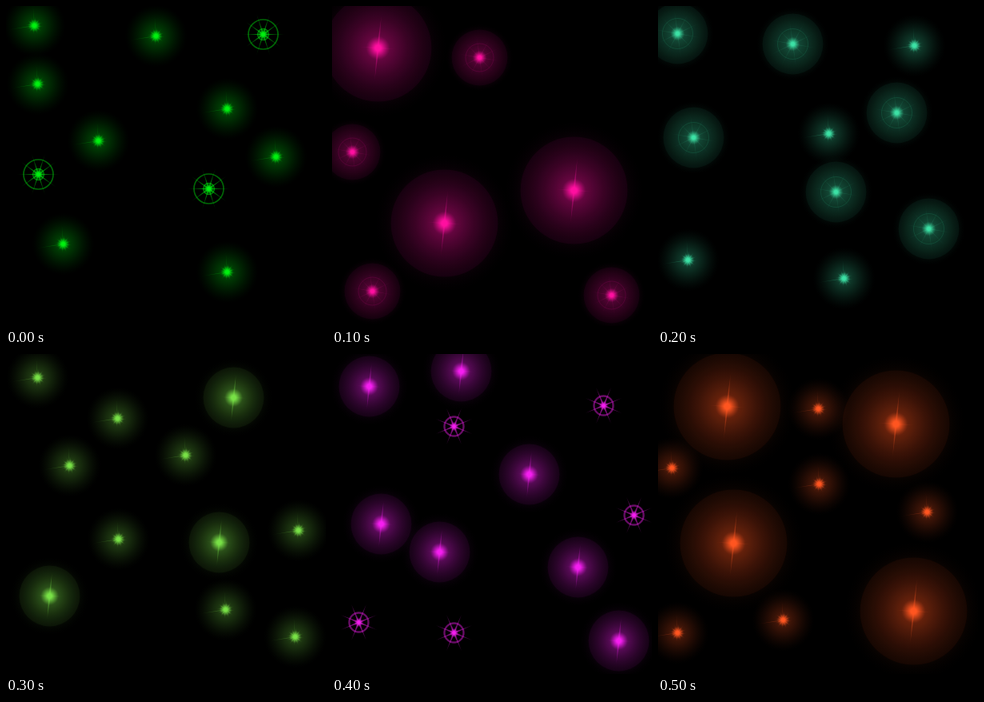
An HTML page with a canvas that plays this animation: 400x400 px, repeating every 0.6 s.

```html
<!DOCTYPE html>
<html lang="en">
<head>
<meta charset="utf-8">
<title>Flashing lights</title>
<style>
html, body { margin: 0; height: 100%; overflow: hidden; background: #000; }
canvas { display: block; }
</style>
</head>
<body>
<canvas id="stage" width="400" height="400"></canvas>
<script>
const ctx = document.getElementById('stage').getContext('2d');
const STEP = 100;
let rgb;

const tint = a => `rgba(${rgb},${Math.min(1, a).toFixed(4)})`;

function circle(r) {
  ctx.beginPath();
  ctx.arc(0, 0, r, 0, Math.PI * 2);
}

function plate(r, alpha) {
  ctx.fillStyle = tint(alpha);
  circle(r);
  ctx.fill();
}

function ring(r, width, alpha) {
  ctx.strokeStyle = tint(alpha);
  ctx.lineWidth = width;
  circle(r);
  ctx.stroke();
}

// Light that falls off as a power of the distance from the rim
function glow(r, alpha, power) {
  const g = ctx.createRadialGradient(0, 0, 0, 0, 0, r);
  for (let t = 0; t <= 1; t += 1 / 16) g.addColorStop(t, tint(alpha * (1 - t) ** power));
  ctx.fillStyle = g;
  circle(r);
  ctx.fill();
}

const core = r => glow(r, 1.4, 1.3);

// A thin spike that fades and narrows towards its tip
function ray(deg, length, width, alpha) {
  ctx.save();
  ctx.rotate(deg * Math.PI / 180);
  const g = ctx.createLinearGradient(0, 0, length, 0);
  g.addColorStop(0, tint(alpha));
  g.addColorStop(1, tint(alpha * 0.15));
  ctx.fillStyle = g;
  ctx.beginPath();
  ctx.moveTo(0, -width / 2);
  ctx.lineTo(length, 0);
  ctx.lineTo(0, width / 2);
  ctx.fill();
  ctx.restore();
}

function rays(count, length, width, alpha, start = 0) {
  for (let i = 0; i < count; i++) ray(start + i * 360 / count, length, width, alpha);
}

function star() {
  glow(39, .36, 1.4);
  rays(12, 11, 1.6, .6, 8);
  ray(171, 33, 1.2, .35);
  ray(-94, 26, 1, .25);
  core(8);
}

function disc(r) {
  const long = 13 + r * .42;
  glow(r * 1.3, .5, 1.8);
  plate(r, .055);
  rays(2, long, 2.4, .5, -84);
  rays(2, long * .55, 1.6, .3, 3);
  core(7 + r * .12);
}

function halo(r) {
  glow(r * 1.2, .36, 1.3);
  plate(r, .05);
  ring(r / 2, 1, .13);
  rays(10, r * .8, 1, .2, 10);
  core(9);
}

function wheel(rim, spokes, start, width, reach) {
  rays(spokes, reach, width, .65, start);
  ring(rim, width, .42);
  core(rim / 4 + 3);
}

function spokedWheel() {
  wheel(18.5, 10, 0, 1.7, 27);
  ring(7, 1.3, .5);
}

const spikedWheel = () => wheel(12, 8, 22.5, 2.4, 25);
const bigDisc = () => disc(67);
const smallDisc = () => disc(38);
const smallHalo = () => halo(35);
const bigHalo = () => halo(38);

// Each scene: a colour, then shapes followed by the x, y of their centres
const scenes = [
  ['0,240,15',
    [star, 35, 24, 187, 37, 39, 97, 276, 128, 115, 168, 337, 188, 71, 297, 276, 332],
    [spokedWheel, 321, 35, 40, 210, 253, 228]],
  ['255,15,160',
    [bigDisc, 57, 52, 302, 230, 140, 271],
    [smallHalo, 184, 64, 25, 182, 50, 356, 349, 361]],
  ['60,225,165',
    [bigHalo, 24, 34, 168, 47, 298, 133, 44, 164, 222, 232, 338, 278],
    [star, 320, 49, 213, 159, 37, 317, 232, 340]],
  ['120,225,70',
    [star, 39, 29, 139, 80, 79, 139, 224, 126, 140, 231, 365, 220, 274, 319, 361, 353],
    [smallDisc, 284, 54, 266, 235, 54, 302]],
  ['245,30,240',
    [smallDisc, 46, 40, 161, 21, 246, 150, 61, 212, 134, 247, 307, 266, 358, 358],
    [spikedWheel, 339, 64, 152, 90, 377, 201, 33, 335, 152, 348]],
  ['255,85,32',
    [bigDisc, 86, 65, 297, 87, 94, 236, 319, 321],
    [star, 200, 68, 17, 142, 201, 162, 336, 197, 24, 348, 156, 332]]
];

function draw([color, ...groups]) {
  rgb = color;
  ctx.fillStyle = '#000';
  ctx.fillRect(0, 0, 400, 400);
  for (const [shape, ...xy] of groups) {
    for (let i = 0; i < xy.length; i += 2) {
      ctx.save();
      ctx.translate(xy[i] + .5, xy[i + 1] + .5);
      shape();
      ctx.restore();
    }
  }
}

let shown = -1;
const start = performance.now();
function tick() {
  const now = Math.max(0, performance.now() - start);
  const index = Math.floor(now / STEP) % scenes.length;
  if (index !== shown) draw(scenes[shown = index]);
  requestAnimationFrame(tick);
}
tick();
</script>
</body>
</html>
```
